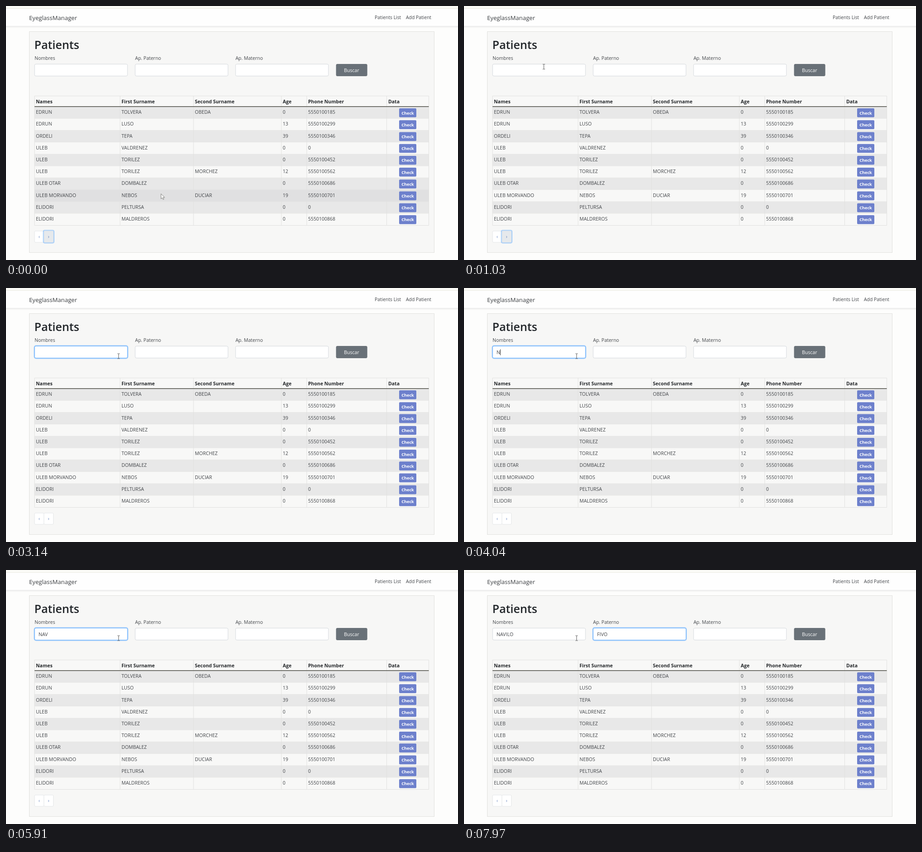
Recreate the animation shown at these times as an HTML page. Size 998 by 561 pixels, loop 8 s.

```html
<!DOCTYPE html>
<html lang="en">
<head>
<meta charset="utf-8">
<title>Patients</title>
<style>
  html, body { margin: 0; width: 100%; height: 100%; overflow: hidden; background: #fdfdfc; }
  svg { display: block; width: 998px; height: 561px; }
  text { font: 10.5px "Open Sans", "Noto Sans", sans-serif; fill: #43464a; white-space: pre; }
  .brand { font-size: 13.1px; fill: #3c3f42; }
  .nav { font-size: 10.35px; }
  .title { font-size: 25.1px; font-weight: 600; fill: #212529; }
  .head { font-weight: 700; fill: #25282b; }
  .entry { font-size: 10.7px; }
  .button { fill: #fff; text-anchor: middle; }
  .check { fill: #fff; text-anchor: middle; font-size: 9.1px; font-weight: 700; }
  .arrow { fill: #6482bd; text-anchor: middle; }
  .field { fill: #fff; stroke: #d5d9dd; }
  .page { fill: #fff; stroke: #e4e6e8; }
  .ring { fill: none; stroke: #007bff; stroke-opacity: .3; stroke-width: 2.2; }
  .line { stroke: #e1e1df; }
  .edge { stroke: #e9e9e2; }
  .rule { stroke: #4b4b43; stroke-width: 1.6; }
</style>
</head>
<body>
<svg id="stage" viewBox="0 0 998 561">
  <defs>
    <linearGradient id="shade" x2="0" y2="1">
      <stop stop-color="#e9e9e9"/><stop offset="1" stop-color="#fdfdfc"/>
    </linearGradient>
  </defs>
</svg>
<script>
const LOOP = 8000;
const ROW_TOP = 222.4, ROW_STEP = 26.22;
const columns = [66, 255, 417, 611, 667, 844];
const borders = [63, 252, 414, 608, 664, 840.5, 933.5];
const headings = ["Names", "First Surname", "Second Surname", "Age", "Phone Number", "Data"];
const patients = [
  ["EDRUN", "TOLVERA", "OBEDA", "0", "5550100185"],
  ["EDRUN", "LUSO", "", "13", "5550100299"],
  ["ORDELI", "TEPA", "", "39", "5550100346"],
  ["ULEB", "VALDRENEZ", "", "0", "0"],
  ["ULEB", "TORILEZ", "", "0", "5550100452"],
  ["ULEB", "TORILEZ", "MORCHEZ", "12", "5550100562"],
  ["ULEB OTAR", "DOMBALEZ", "", "0", "5550100686"],
  ["ULEB MORVANDO", "NEBOS", "DUCIAR", "19", "5550100701"],
  ["ELIDORI", "PELTURSA", "", "0", "0"],
  ["ELIDORI", "MALDREROS", "", "0", "5550100868"]
];

// keys: typing times; from/to: focus span
const fields = [
  { label: "Nombres", x: 63, value: "NAVILO", keys: [3700, 4850, 5250, 5990, 6170, 6370], from: 1500, to: 6650 },
  { label: "Ap. Paterno", x: 285, value: "FIVO", keys: [6880, 7050, 7220, 7400], from: 6650, to: LOOP },
  { label: "Ap. Materno", x: 506.7, value: "", keys: [], from: LOOP, to: LOOP }
];
// time, x, y of the pointer's hot spot
const pointerPath = [
  [0, 342.5, 415], [630, 196.5, 281], [1030, 176.3, 134],
  [1200, 178, 139], [1600, 178, 139], [2000, 248.7, 150.5], [LOOP, 248.7, 150.5]
];

const stage = document.getElementById("stage");

function add(tag, attrs) {
  const el = document.createElementNS("http://www.w3.org/2000/svg", tag);
  for (const name in attrs) el.setAttribute(name, attrs[name]);
  return stage.appendChild(el);
}
const rect = (x, y, width, height, attrs) => add("rect", { x, y, width, height, ...attrs });
const line = (x1, y1, x2, y2, name = "line") => add("line", { x1, y1, x2, y2, class: name });
function text(x, y, content, name = "") {
  const el = add("text", { x, y, class: name });
  el.textContent = content;
  return el;
}
const show = (el, on) => el.setAttribute("visibility", on ? "visible" : "hidden");

// Navigation bar and card
rect(0, 0, 998, 5, { fill: "#fbfbf7" });
line(0, 5.5, 998, 5.5, "edge");
rect(0, 6, 998, 38, { fill: "#fefefe" });
rect(0, 44, 998, 5, { fill: "url(#shade)" });
text(51, 30.5, "EyeglassManager", "brand");
text(814, 29.3, "Patients List", "nav");
text(883, 29.3, "Add Patient", "nav");
rect(51.5, 56.5, 894, 488, { fill: "#f7f7f6", stroke: "#e1e1de" });
text(62.5, 95, "Patients", "title");

// Search form
for (const field of fields) {
  text(field.x, 118.7, field.label);
  field.box = rect(field.x + .2, 128.3, 205, 26.4, { rx: 3, class: "field" });
  field.ring = rect(field.x - .6, 127.4, 206.6, 28.2, { rx: 4, class: "ring" });
  field.text = text(field.x + 8.7, 145.8, "", "entry");
  field.caret = rect(0, 135.5, 1, 13, { fill: "#222" });
}
rect(728.7, 128, 69, 27, { rx: 3, fill: "#697178" });
text(763, 145.8, "Buscar", "button");

// Table
rect(63, 199, 870.5, 23, { fill: "#f8f8f7" });
headings.forEach((heading, i) => text(columns[i], 214.6, heading, "head"));
const rows = patients.map((cells, i) => {
  const y = ROW_TOP + i * ROW_STEP;
  const fill = i % 2 ? "#f8f8f7" : "#e8e8e8";
  const row = { fill, el: rect(63, y, 870.5, ROW_STEP, { fill }) };
  line(63, y + ROW_STEP, 933.5, y + ROW_STEP);
  cells.forEach((cell, c) => text(columns[c], y + 15.7, cell));
  return row;
});
line(63, 198.8, 933.5, 198.8);
borders.forEach(x => line(x, 198.8, x, 484.6));
line(63, 222.2, 933.5, 222.2, "rule");
rows.forEach((row, i) => {
  const y = 226 + i * ROW_STEP;
  rect(868, y, 38, 19.7, { rx: 2, fill: "#6d80cc" });
  text(887, y + 13.5, "Check", "check");
});

// Pager
rect(63, 497, 20.8, 25, { rx: 2, class: "page" });
const nextBox = rect(83.8, 497, 20.8, 25, { rx: 2, class: "page" });
const nextRing = rect(82.5, 495.5, 23.4, 27.8, { rx: 3, class: "ring" });
text(73.4, 513, "‹", "arrow");
text(94.2, 513, "›", "arrow");

// Pointers
const arrow = add("path", {
  d: "M0 0V11.2L2.7 8.7L4.6 12.7L6.4 11.9L4.6 8H8Z",
  fill: "#fff", stroke: "#70706c", "stroke-width": .9
});
const beam = add("path", {
  d: "M-2.5-5.5H-.7L0-5L.7-5.5H2.5M0-5V5M-2.5 5.5H-.7L0 5L.7 5.5H2.5",
  fill: "none", stroke: "#555"
});

function pointerAt(t) {
  const i = Math.max(1, pointerPath.findIndex(p => p[0] >= t));
  const [t0, x0, y0] = pointerPath[i - 1], [t1, x1, y1] = pointerPath[i];
  const k = Math.max(0, (t - t0) / (t1 - t0));
  return [x0 + (x1 - x0) * k, y0 + (y1 - y0) * k];
}

function draw(t) {
  const [x, y] = pointerAt(t);
  const overField = y > 128 && y < 156;
  arrow.setAttribute("transform", `translate(${x} ${y})`);
  beam.setAttribute("transform", `translate(${x} ${y})`);
  show(arrow, !overField);
  show(beam, overField);

  // The row highlight trails the pointer slightly
  const hovered = Math.floor((pointerAt(t - 90)[1] + 3 - ROW_TOP) / ROW_STEP);
  rows.forEach((row, i) => row.el.setAttribute("fill", i === hovered ? "#e0e0e1" : row.fill));

  for (const field of fields) {
    const focused = t >= field.from && t < field.to;
    const typed = field.keys.filter(k => k <= t);
    field.text.textContent = field.value.slice(0, typed.length);
    field.box.style.stroke = focused ? "#80bdff" : "";
    show(field.ring, focused);
    const lastEdit = typed.length ? typed[typed.length - 1] : field.from;
    show(field.caret, focused && (t - lastEdit) % 1060 < 530);
    field.caret.setAttribute("x", field.x + 8.7 + field.text.getComputedTextLength());
  }

  const pagerFocused = t < fields[0].from;
  show(nextRing, pagerFocused);
  nextBox.style.fill = pagerFocused ? "#e6e9ec" : "";
}

const start = performance.now();
function tick() {
  draw((performance.now() - start) % LOOP);
  requestAnimationFrame(tick);
}
tick();
</script>
</body>
</html>
```
